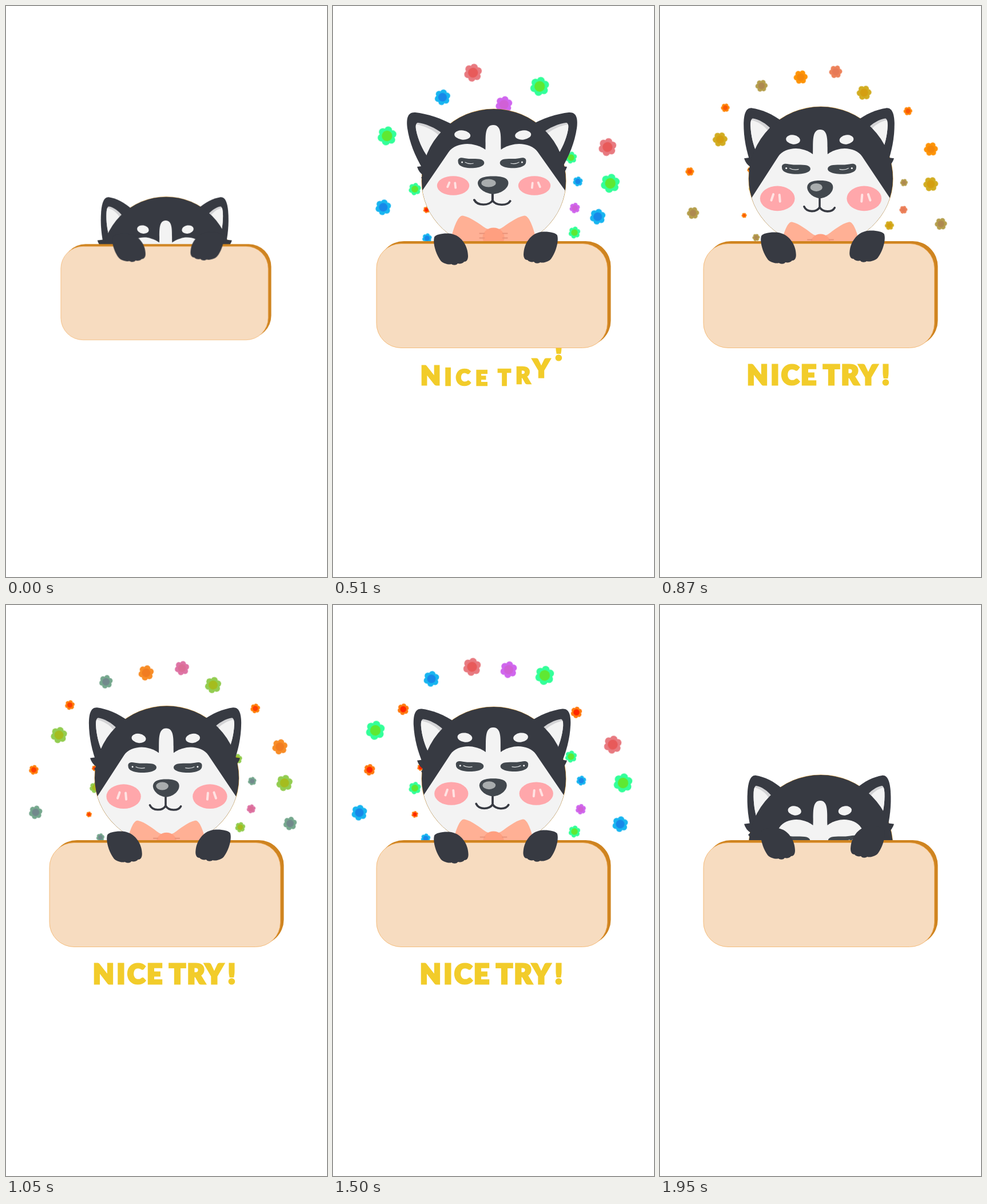
An HTML page without scripts that plays this animation: 561 px wide and 998 px high, repeating every 1980 ms.

```html
<!DOCTYPE html>
<html lang="en">
<head>
<meta charset="utf-8">
<title>Nice try</title>
<style>
@property --y { syntax: '<number>'; inherits: true; initial-value: 0; }
@property --look { syntax: '<number>'; inherits: true; initial-value: 0; }
@property --mix { syntax: '<percentage>'; inherits: true; initial-value: 0%; }

html, body { margin: 0; width: 100%; height: 100%; overflow: hidden; background: #fff; }
svg { display: block; width: 100vw; height: 100vh; }
.scene, .head, .paw, .flower, .letters text { animation: 1980ms linear infinite both; }

.dark { fill: #373a42; }
.white { fill: #f3f3f3; }
.line { fill: none; stroke: #373a42; stroke-width: 3.6; stroke-linecap: round; stroke-linejoin: round; }

/* whole scene pops up to size */
.scene { animation-name: pop; }
@keyframes pop {
  0% { transform: translate(27.9px, 47.5px) scale(.897); }
  7%, 100% { transform: none; }
}

/* --y lifts the head, --look tilts it: negative is up */
.head { animation-name: peek; transform: translateY(calc(var(--y) * 1px)); }
@keyframes peek {
  0% { --y: 142; --look: 8; animation-timing-function: ease-in; }
  15.15% { --y: 117; --look: -1; }
  20.5% { --y: 53; --look: -7; animation-timing-function: ease-out; }
  25.76% { --y: 3; --look: -10; animation-timing-function: ease-in-out; }
  32% { --y: -2; --look: -4; animation-timing-function: ease-out; }
  43.94% { --y: -1; --look: 2; }
  62.12% { --y: 0; --look: 0; }
  75.76% { --y: 1; --look: -2; }
  83.33% { --y: 4; --look: -1; animation-timing-function: ease-in; }
  98.48%, 100% { --y: 120; --look: 7; }
}
.ear {
  transform-origin: 208px 217px;
  transform: matrix(calc(1 - .0193 * var(--look)), 0, calc(-.0121 * var(--look)), 1, 0, calc(-.3 * var(--look)));
}
.tuft { transform: translateY(calc(var(--look) * -.9px)); }
.mask, .brow, .eye, .nose, .mouth, .bow { transform-origin: 280px 0; }
.mask { transform: translateY(calc(var(--look) * 1px)) scaleX(calc(1 - .005 * var(--look))); }
.brow { transform: translateY(calc(var(--look) * 1px)) scaleX(calc(1 - .011 * var(--look))); }
.eye { transform: translateY(calc(var(--look) * 1.2px)) scaleX(calc(1 + .007 * var(--look))); }
.nose { transform: translateY(calc(var(--look) * .95px)) scaleX(calc(1 - .015 * var(--look))); }
.mouth { transform: translateY(calc(var(--look) * 1.3px)) scaleX(calc(1 - .014 * var(--look))); }
.bow { transform: translateY(calc(var(--look) * 1.25px)) scaleX(calc(1 - .006 * var(--look))); }
.cheek {
  transform-origin: 206px 333px;
  transform: translate(calc(var(--look) * -.4px), calc(var(--look) * 2.2px)) scale(calc(1 + .006 * var(--look)), calc(1 + .02 * var(--look)));
}

.paw { transform-origin: 177px 0; animation-name: grip; }
@keyframes grip {
  0%, 15.15% { transform: translateY(-7px) scaleX(1.08); }
  25.76% { transform: translateY(0) scaleX(1); }
  43.94%, 62.12% { transform: translateY(-2px) scaleX(1.03); }
  75.76% { transform: translateY(-1px) scaleX(1.01); }
  83.33% { transform: translateY(-2px) scaleX(1.03); }
  98.48%, 100% { transform: translateY(-8px) scaleX(1); }
}

/* flowers: --u --v reach, --a --b start, --r size, --k --m --l --n reach factors, --fade --tint orange share */
.flower {
  --a: 0; --b: 20; --l: 1; --n: 1; --fade: 78%; --tint: 0%;
  animation-name: burst;
}
.petal { fill: color-mix(in srgb, #ff9500 var(--mix), var(--c)); }
.heart { fill: color-mix(in srgb, #f58a08 var(--mix), var(--d)); }
.green { --c: #33ff99; --d: #5fe832; --r: 1.7; --k: .9; --m: .85; --l: .97; --tint: 16%; }
.pink { --c: #e87a80; --d: #e85a5a; --r: 1.6; --k: .955; --m: .925; --l: .975; --fade: 95%; --tint: 45%; }
.blue { --c: #18b5f0; --d: #1888e8; --r: 1.4; --k: .82; --m: .95; --fade: 68%; --tint: 14%; }
.purple { --c: #d066ee; --d: #d060d6; --r: 1.5; --k: .68; --m: 1; --l: 1.04; --fade: 62%; }
.red { --c: #ff7a10; --d: #ff2600; --r: 1; --k: .3; --m: .97; --n: .92; --fade: 50%; }
@keyframes burst {
  0%, 13.6% { transform: translate(281px, 330px) scale(0); --mix: 0%; }
  15.15% { transform: translate(calc(281px + var(--a) * 1px), calc(300px + var(--b) * 1px)) scale(calc(var(--r) * .52)); }
  25.76% { transform: translate(calc(281px + var(--u) * var(--k) * 1px), calc(300px + var(--v) * var(--k) * 1px)) rotate(12deg) scale(var(--r)); --mix: 0%; }
  30.3% { transform: translate(calc(281px + var(--u) * 1px), calc(300px + var(--v) * 1px)) rotate(16deg) scale(var(--r)); --mix: 0%; }
  43.94% { transform: translate(calc(281px + var(--u) * var(--m) * 1px), calc(302px + var(--v) * var(--m) * 1px)) rotate(25deg) scale(calc(var(--r) * .77)); --mix: var(--fade); }
  62.12% { transform: translate(calc(281px + var(--u) * var(--l) * 1px), calc(300px + var(--v) * var(--l) * 1px)) rotate(4deg) scale(calc(var(--r) * .94)); --mix: var(--tint); }
  75.76% { transform: translate(calc(281px + var(--u) * var(--n) * 1px), calc(300px + var(--v) * var(--n) * 1px)) rotate(10deg) scale(var(--r)); --mix: 0%; }
  83.33% { transform: translate(calc(281px + var(--u) * .96px), calc(300px + var(--v) * .96px)) rotate(14deg) scale(calc(var(--r) * .95)); --mix: 12%; }
  93.94%, 100% { transform: translate(calc(281px + var(--u) * .82px), calc(300px + var(--v) * .82px)) rotate(25deg) scale(0); --mix: 75%; }
}

.letters text {
  font: 900 47.5px Lato, sans-serif;
  text-anchor: middle;
  color: #f2cc2a;
  fill: currentColor;
  stroke: currentColor;
  stroke-width: 3.2;
  animation-name: drop;
  animation-delay: calc(var(--i) * 30ms);
}
@keyframes drop {
  0%, 13.6% { opacity: 0; color: #ff9f0a; transform: translateY(-7px) scale(.68); }
  13.63% { opacity: 1; color: #ff9f0a; transform: translateY(-7px) scale(.68); }
  15.15% { opacity: 1; color: #f2cc2a; transform: translateY(-44px) scale(1); }
  16.67% { transform: translateY(-13px) scale(.93); }
  18.18% { transform: translateY(-2px) scale(.82); }
  19.7% { transform: translateY(2px) scale(.78); }
  21.2% { transform: translateY(1px) scale(.77); }
  24.2% { transform: translateY(1px) scale(.85); }
  25.76% { transform: translateY(1px) scale(.95); }
  27.3%, 75.76% { transform: translateY(0) scale(1); }
  77.3% { transform: translateY(1px) scale(.95); }
  80.3% { transform: translateY(1px) scale(.8); }
  83.3% { transform: translateY(2px) scale(.78); }
  86.3% { opacity: 1; color: #f2cc2a; transform: translateY(-44px) scale(1); }
  87.8% { opacity: 1; color: #ff9f0a; transform: translateY(-7px) scale(.68); }
  87.85%, 100% { opacity: 0; color: #ff9f0a; transform: translateY(-7px) scale(.68); }
}
</style>
</head>
<body>
<svg viewBox="0 0 561 998" xmlns="http://www.w3.org/2000/svg">
  <defs>
    <circle id="p" r="4" cy="-5.9"/>
    <g id="bloom">
      <g class="petal">
        <circle r="6.4"/>
        <use href="#p"/>
        <use href="#p" transform="rotate(60)"/>
        <use href="#p" transform="rotate(120)"/>
        <use href="#p" transform="rotate(180)"/>
        <use href="#p" transform="rotate(240)"/>
        <use href="#p" transform="rotate(300)"/>
      </g>
      <circle class="heart" r="5.4"/>
    </g>
    <path id="skull" d="M155 303A126 126 0 0 1 407 303A126 118 0 0 1 155 303Z"/>
    <clipPath id="face"><use href="#skull"/></clipPath>

    <g id="ear">
      <g class="ear">
        <path class="dark" d="M214 204C196 190 174 182 158 180C147 179 143.500 190 143.500 207C144 233 150 256 158 277L210 270Z"/>
        <path fill="#d3d3d5" d="M160 198C157 198 156 203 156 210C157 228 162 245 168 257C172 240 182 226 194 217C185 207 170 199 160 198Z"/>
        <path class="white" d="M157 201C156 203 156 206 156 210C157 228 162 245 168 257C172 241 180 228 189 221C181 210 168 203 157 201Z"/>
      </g>
      <path class="dark tuft" d="M147 269L162 267L166 302L154 288L158 284Q150 279 147 269Z"/>
    </g>
    <g id="eye">
      <g class="eye">
        <path fill="#42484e" d="M214 281C213 275 218 273 226 275C236 277 249 275 257 277C264 279 265 285 260 288C252 293 235 293 226 291C218 289 214 286 214 281Z"/>
        <circle cx="221.500" cy="282" r="1.5" fill="#fff"/>
        <path d="M227 282Q234 286 243 284" fill="none" stroke="#dfe2e3" stroke-width="1.2"/>
      </g>
    </g>
    <g id="cheek">
      <g class="cheek">
        <ellipse cx="206" cy="333" rx="30" ry="21" fill="#ffa7ab"/>
        <path d="M199 326L195.500 336M209.500 327L210.500 338" fill="none" stroke="#ffe3e3" stroke-width="4" stroke-linecap="round"/>
      </g>
    </g>
    <path id="wing" fill="#ffb095" d="M281 403L268 398C256 390 244 379 230 376C221 375 214 400 209 422L209 440H281Z"/>
    <path id="paw" class="dark" d="M177 404C180 398 200 396 210 399C225 403 236 420 236 437C236 444 233 447 229 447C227 450 222 451 218 450C215 454 209 453 207 451C201 453 191 449 188 445C180 434 174 415 177 404Z"/>
  </defs>

  <g class="letters">
    <g transform="translate(170.500 661.500)"><text style="--i:0">N</text></g>
    <g transform="translate(201 661.500)"><text style="--i:1">I</text></g>
    <g transform="translate(227.500 661.500)"><text style="--i:2">C</text></g>
    <g transform="translate(259.500 661.500)"><text style="--i:3">E</text></g>
    <g transform="translate(299.500 661.500)"><text style="--i:4">T</text></g>
    <g transform="translate(332 661.500)"><text style="--i:5">R</text></g>
    <g transform="translate(364 661.500)"><text style="--i:6">Y</text></g>
    <g transform="translate(394.500 661.500)"><text style="--i:7">!</text></g>
  </g>

  <g class="flowers">
    <use href="#bloom" class="flower red" style="--u:-172;--v:-128"/>
    <use href="#bloom" class="flower red" style="--u:157;--v:-122"/>
    <use href="#bloom" class="flower red" style="--u:-236;--v:-13"/>
    <use href="#bloom" class="flower red" style="--u:-138;--v:66;--r:.6;--k:.85;--n:1"/>
    <use href="#bloom" class="flower red" style="--u:-128;--v:-16;--r:.6;--n:1"/>
    <use href="#bloom" class="flower green" style="--u:-207;--v:-81;--a:-18;--b:-20"/>
    <use href="#bloom" class="flower green" style="--u:89;--v:-177"/>
    <use href="#bloom" class="flower green" style="--u:226;--v:11;--a:59;--b:0"/>
    <use href="#bloom" class="flower green" style="--u:135;--v:-35;--r:1.05;--k:1"/>
    <use href="#bloom" class="flower green" style="--u:141;--v:96;--r:1.05;--k:1"/>
    <use href="#bloom" class="flower green" style="--u:-138;--v:20;--r:1.1;--k:1"/>
    <use href="#bloom" class="flower pink" style="--u:-38;--v:-192;--a:-65;--b:-8"/>
    <use href="#bloom" class="flower pink" style="--u:208;--v:-56;--a:47;--b:-27"/>
    <use href="#bloom" class="flower blue" style="--u:-109;--v:-171"/>
    <use href="#bloom" class="flower blue" style="--u:-235;--v:63"/>
    <use href="#bloom" class="flower blue" style="--u:221;--v:83"/>
    <use href="#bloom" class="flower blue" style="--u:153;--v:7;--r:.87;--k:.96"/>
    <use href="#bloom" class="flower blue" style="--u:-119;--v:108;--r:.85;--k:.98"/>
    <use href="#bloom" class="flower purple" style="--u:26;--v:-187"/>
    <use href="#bloom" class="flower purple" style="--u:152;--v:57;--r:.92;--k:.93;--m:.95;--l:.99"/>
  </g>

  <g class="scene">
    <g class="head">
      <use href="#skull" fill="none" stroke="#f0a52c" stroke-width="1"/>
      <use href="#ear"/>
      <use href="#ear" transform="matrix(-1 0 0 1 556 0)"/>
      <use href="#skull" class="dark"/>
      <g clip-path="url(#face)">
        <path class="white mask" d="M150 348L206 262C214 249 236 245 250 250C258 252 263 255 267 258C268 240 264 215 280 215C296 215 292 240 293 258C297 255 302 252 310 250C324 245 346 249 354 262L412 348V450H150Z"/>
        <g class="white brow">
          <ellipse cx="231.500" cy="232.500" rx="12.700" ry="8" transform="rotate(8 231.500 232.500)"/>
          <ellipse cx="327" cy="232.500" rx="12.700" ry="8" transform="rotate(-8 327 232.500)"/>
        </g>
        <use href="#cheek"/>
        <use href="#cheek" transform="matrix(-1 0 0 1 562 0)"/>
        <use href="#eye"/>
        <use href="#eye" transform="matrix(-1 0 0 1 556 0)"/>
        <path class="line mouth" d="M279 333V350M251 349C256 360 274 359 279 350C284 359 301 360 306 351"/>
        <g class="nose">
          <path fill="#42484e" d="M256.500 316C257 306 268 304 280 304C292 304 303 306 303 316C303 326 290 335 280 335C270 335 257 327 256.500 316Z"/>
          <ellipse cx="273" cy="316" rx="11" ry="7" fill="#a9adae"/>
        </g>
      </g>
      <g class="bow">
        <use href="#wing"/>
        <use href="#wing" transform="matrix(-1 0 0 1 561 0)"/>
        <ellipse cx="280.500" cy="414" rx="18" ry="17" fill="#ff9f80"/>
        <path d="M257 407H266M295 407H304M257 415H266M295 415H304" stroke="#e8937a" stroke-width="1.8"/>
      </g>
    </g>

    <rect x="80" y="411" width="405.500" height="183" rx="44" fill="#cf8420"/>
    <rect x="76" y="415.500" width="403.500" height="182" rx="43" fill="#f7dcc0" stroke="#f3b064" stroke-width=".8"/>

    <use href="#paw" class="paw"/>
    <g transform="matrix(-1 0 0 1 569 -3)"><use href="#paw" class="paw"/></g>
  </g>
</svg>
</body>
</html>
```
